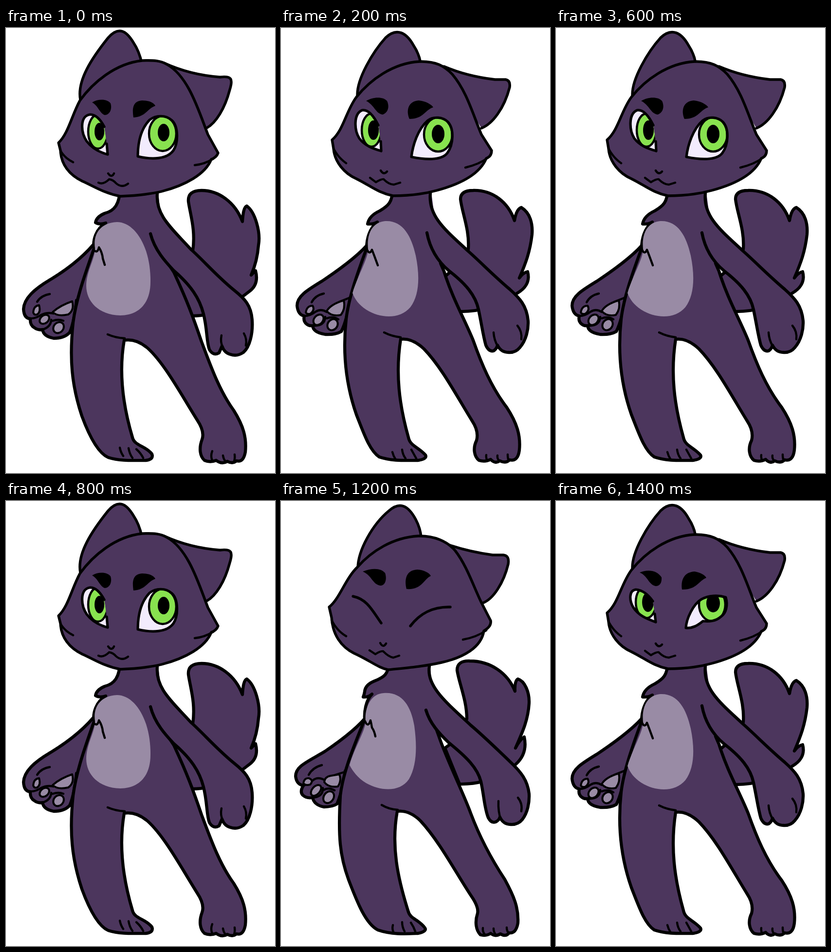
These frames come from a looping animation (553 px wide and 915 px high, 1.6 s). An HTML page without scripts:

```html
<!DOCTYPE html>
<html lang="en">
<head>
<meta charset="utf-8">
<title>Purple cat</title>
<style>
  html, body { margin: 0; width: 100%; height: 100%; overflow: hidden; background: #fff; }
  svg { display: block; width: 100%; height: 100%; }
  path, ellipse { fill: #4c365d; stroke: #000; stroke-width: 6.3; stroke-linecap: round; stroke-linejoin: round; }
  .head path { stroke-width: 5.4; }
  .line, .head .line { fill: none; stroke-width: 4.4; }
  .belly { fill: #998ba5; stroke: none; }
  .pads * { fill: #998ba5; stroke-width: 4; }
  .brow path { fill: #000; stroke: none; }
  .eye { fill: inherit; stroke: inherit; stroke-width: inherit; }
  .white { fill: #f2ebfd; stroke: none; }
  .iris { fill: #88e24f; stroke-width: 4.5; }
  .pupil { fill: #000; stroke: none; }
  .rim { fill: none; stroke: #000; stroke-width: 5.2; }
  .lid { fill: none; }

  /* sway: rest, middle, lean, middle */
  .rest, .lean { animation: quarter .8s step-end infinite; }
  .lean { animation-delay: -.4s; }
  .middle { animation: odd .8s step-end infinite; }
  /* eyes stay open in the first sway and blink in the second */
  .open, .blink { animation: half 1.6s step-end infinite; }
  .blink { animation-delay: -.8s; }
  @keyframes quarter { 0% { opacity: 1 } 25%, 100% { opacity: 0 } }
  @keyframes odd { 0%, 50% { opacity: 0 } 25%, 75%, 100% { opacity: 1 } }
  @keyframes half { 0% { opacity: 1 } 50%, 100% { opacity: 0 } }
</style>
</head>
<body>
<svg viewBox="0 0 553 915" preserveAspectRatio="none">
  <defs>
    <path id="restL" class="eye" d="M202 203Q188 177 172 178C152 181 153 214 166 233C178 249 194 256 209 260L207 238"/>
    <path id="restR" class="eye" d="M271 264C271 242 275 210 295 189C308 179 328 178 341 190C354 202 355 235 344 252C331 270 300 271 271 264Z"/>
    <path id="leanL" class="eye" d="M199 197Q183 164 166 166C148 173 149 206 160 224C172 240 189 245 205 250L204 230"/>
    <path id="leanR" class="eye" d="M267 262C270 238 280 205 301 187C313 178 332 180 342 190C355 204 354 236 341 254C329 270 295 268 267 262Z"/>
    <path id="halfL" class="eye" d="M199 206Q184 184 164 182C150 184 150 204 159 219C171 237 189 243 205 249L203 232"/>
    <path id="halfR" class="eye" d="M267 261C268 242 282 212 299 202C314 194 333 193 349 198C354 215 349 231 340 237C328 248 315 248 302 247C291 256 281 262 267 261Z"/>
    <clipPath id="inRestL"><use href="#restL"/></clipPath>
    <clipPath id="inRestR"><use href="#restR"/></clipPath>
    <clipPath id="inLeanL"><use href="#leanL"/></clipPath>
    <clipPath id="inLeanR"><use href="#leanR"/></clipPath>
    <clipPath id="inHalfL"><use href="#halfL"/></clipPath>
    <clipPath id="inHalfR"><use href="#halfR"/></clipPath>

    <g id="leanEyes">
      <g class="brow">
        <path d="M174 147C187 139 208 137 217 147C223 160 218 172 208 175C193 173 191 155 174 147Z"/>
        <path d="M263 184C255 165 262 147 282 146C297 147 309 155 312 160C294 166 292 184 263 184Z"/>
      </g>
      <g clip-path="url(#inLeanL)">
        <use href="#leanL" class="white"/>
        <ellipse class="iris" cx="185" cy="207" rx="20" ry="34"/>
        <ellipse class="pupil" cx="189" cy="207" rx="11" ry="20"/>
      </g>
      <use href="#leanL" class="rim"/>
      <g clip-path="url(#inLeanR)">
        <use href="#leanR" class="white"/>
        <ellipse class="iris" cx="322" cy="216" rx="29" ry="35"/>
        <ellipse class="pupil" cx="322" cy="215" rx="13" ry="19"/>
      </g>
      <use href="#leanR" class="rim"/>
    </g>
  </defs>

  <g class="rest">
    <path d="M384 458C390 415 379 385 375 357Q373 334 402 334C437 334 471 358 486 398C487 382 489 368 495 366C512 378 524 420 519 447C517 474 511 492 504 508L513 499C518 518 513 532 501 541C476 560 440 593 380 592L346 508L358 498"/>
    <path d="M188 435C165 465 130 494 90 518C58 537 37 556 36 578Q37 597 50 598Q49 611 58 616Q66 622 75 620Q77 634 98 638Q120 638 131 626Q140 605 145 560"/>
    <path class="line" d="M64 563Q72 550 90 547M50 597Q60 598 72 590Q84 584 98 587M75 620Q92 615 93 600M96 602Q108 598 118 602"/>
    <g class="pads">
      <path d="M96 584Q112 570 136 562Q141 580 128 589Q105 594 96 584Z"/>
      <path d="M56 585Q57 571 68 570Q72 584 64 589Q58 591 56 585Z"/>
      <ellipse cx="79" cy="599" rx="11" ry="8" transform="rotate(-40 79 599)"/>
      <ellipse cx="108" cy="616" rx="12" ry="10" transform="rotate(-50 108 616)"/>
    </g>
    <path d="M312 330H234C234 362 223 376 203 381Q186 388 184 400Q192 405 205 401C185 413 178 436 181 453C165 500 145 552 138 605C130 680 135 735 156 798C170 836 188 873 210 883C235 891 262 889 288 889Q304 887 300 876C287 859 264 859 260 842C240 775 232 705 243 642Q268 638 292 659C326 690 361 755 393 806Q409 830 403 846C396 865 399 881 408 889Q420 894 432 889Q444 898 455 891Q466 897 474 890Q488 894 492 872C495 842 488 818 468 786C438 745 419 690 402 645C385 595 372 560 345 502L328 476"/>
    <path class="belly" d="M228 399C266 399 298 452 297 522C297 566 273 591 235 591C190 590 165 562 165 530C165 500 183 475 183 453C179 428 190 401 228 399Z"/>
    <path class="line" d="M181 457Q188 464 191 451Q198 462 199 474L203 487M209 630Q225 637 244 638M234 863Q236 873 241 880M252 864Q254 876 260 884M268 866Q277 874 282 884M424 870Q420 880 424 889M446 879Q447 886 451 891M470 877Q471 885 469 891"/>
    <path d="M297 423C306 458 330 483 345 499C380 529 398 556 406 588C414 620 412 645 418 661Q426 675 438 668L444 654Q449 668 461 671Q475 676 488 667C501 656 508 628 506 600C504 570 490 556 470 540C435 512 405 477 380 455C340 411 307 385 311 340"/>
    <path class="line" d="M443 632Q440 646 446 657M489 628Q496 640 493 653"/>
    <g class="head">
      <path d="M153 148C145 108 178 60 210 20C231 -4 247 5 262 30Q274 48 279 72M325 72C360 88 400 98 440 101C464 98 467 105 460 127C450 165 432 195 412 206"/>
      <path d="M108 236C128 217 135 180 152 149C178 113 224 73 280 67C304 66 318 67 331 75C375 99 396 170 415 219L436 257Q433 266 422 270C410 301 367 324 320 336C290 343 260 345 235 346C202 340 180 325 157 315C130 302 113 280 112 252Z"/>
      <path class="line" d="M112 252Q120 267 138 276M388 282Q408 280 426 269M210 299Q217 309 222 299M190 318Q200 323 212 311Q220 312 226 319Q238 330 251 320"/>
      <g class="brow">
        <path d="M177 153C190 145 209 146 215 155C219 168 212 179 203 179C192 175 190 160 177 153Z"/>
        <path d="M262 184C259 165 261 150 280 149C296 149 305 155 307 160C290 166 288 182 262 184Z"/>
      </g>
      <g clip-path="url(#inRestL)">
        <use href="#restL" class="white"/>
        <ellipse class="iris" cx="189" cy="213" rx="20" ry="35"/>
        <ellipse class="pupil" cx="192" cy="213" rx="10" ry="18"/>
      </g>
      <use href="#restL" class="rim"/>
      <g clip-path="url(#inRestR)">
        <use href="#restR" class="white"/>
        <ellipse class="iris" cx="322" cy="217" rx="28" ry="36"/>
        <ellipse class="pupil" cx="324" cy="215" rx="12" ry="18"/>
      </g>
      <use href="#restR" class="rim"/>
    </g>
  </g>

  <g class="middle">
    <path d="M385 455C388 415 372 380 369 352Q369 334 395 334C435 333 467 358 480 396Q484 372 494 369C512 380 518 402 516 425C512 460 503 484 490 514Q498 503 507 501C513 523 500 537 486 545C463 562 425 584 365 583L337 511L352 498"/>
    <path d="M184 438C165 463 130 490 85 520C52 540 33 552 33 571Q35 590 48 592Q45 603 53 609Q58 613 65 612Q66 626 91 630Q112 631 124 624Q136 600 142 555"/>
    <path class="line" d="M63 564Q70 550 88 546M48 592Q60 592 70 584Q82 576 94 584M65 612Q90 614 91 594M94 597Q107 592 118 599M120 563L140 555"/>
    <g class="pads">
      <path d="M94 582Q102 568 129 560Q133 577 123 590Q104 594 94 582Z"/>
      <path d="M51 585Q53 571 65 571Q70 580 61 587Q54 590 51 585Z"/>
      <ellipse cx="77" cy="600" rx="12" ry="9" transform="rotate(-48 77 600)"/>
      <ellipse cx="106" cy="610" rx="12" ry="10" transform="rotate(-55 106 610)"/>
    </g>
    <path d="M308 330H229C230 358 220 366 203 376Q181 386 178 403Q188 404 198 399C182 412 176 433 176 453C158 502 139 555 134 598C126 670 134 735 155 795C170 833 182 869 202 882C228 891 257 889 282 889Q301 886 297 878C283 862 265 859 262 842C243 775 235 710 246 640Q270 637 294 660C330 697 362 758 393 808Q407 829 402 848C394 864 397 881 407 889Q420 893 431 887Q440 897 450 890Q462 896 470 888Q487 892 490 868C493 838 485 812 464 780C432 738 412 690 395 642C378 600 352 555 335 500L328 484"/>
    <path class="belly" d="M214 397C250 395 268 427 277 468C286 512 284 550 266 574C245 599 205 598 175 579C160 569 152 558 147 545C155 515 179 475 179 455C176 425 186 400 214 397Z"/>
    <path class="line" d="M177 456Q182 467 187 456Q189 461 192 469L199 488M212 626Q228 634 246 636M229 872Q231 880 235 886M249 867Q250 877 256 885M268 867Q273 876 278 885M422 878Q421 884 424 889M445 879Q444 886 449 890M466 877Q466 885 468 889"/>
    <path d="M300 421C307 458 325 482 345 499C380 526 400 550 406 579C413 612 415 630 421 652Q427 666 437 664Q444 659 445 652Q452 667 468 667Q482 668 491 657C504 642 509 620 508 602C505 570 490 555 470 537C440 512 410 481 385 459C340 417 302 388 307 340"/>
    <path class="line" d="M437 626Q438 642 446 655M486 612Q496 624 494 640"/>
    <g class="head">
      <path d="M157 138C156 105 188 50 215 20C238 -2 258 10 272 35Q284 53 287 72M335 79C370 94 405 102 440 106L462 106Q472 108 470 122C459 165 435 197 412 206"/>
      <path d="M105 230C128 211 134 170 155 142C183 107 230 72 285 69C318 68 336 78 352 95C382 130 395 179 412 219L433 252Q433 264 422 268C408 302 365 322 320 334C295 341 260 345 230 345C200 339 185 325 155 310C130 299 110 275 108 248Z"/>
      <path class="line" d="M108 248Q118 267 134 278M379 287Q408 280 425 267M205 293Q211 303 218 295M183 308L195 317Q207 310 211 311Q222 322 232 322L245 318"/>
      <use href="#leanEyes" class="open" x="1" y="3"/>
      <g class="blink">
        <g class="brow">
          <path d="M172 147C188 140 208 142 217 157C218 170 212 175 205 175C190 172 189 154 172 147Z"/>
          <path d="M259 182C256 160 265 146 285 145C298 147 307 153 309 158C293 164 289 183 259 182Z"/>
        </g>
        <g clip-path="url(#inHalfL)">
          <use href="#halfL" class="white"/>
          <ellipse class="iris" cx="185" cy="208" rx="21" ry="33"/>
          <ellipse class="pupil" cx="189" cy="208" rx="12" ry="20"/>
        </g>
        <use href="#halfL" class="rim"/>
        <g clip-path="url(#inHalfR)">
          <use href="#halfR" class="white"/>
          <ellipse class="iris" cx="321" cy="213" rx="27" ry="34"/>
          <ellipse class="pupil" cx="323" cy="210" rx="14" ry="19"/>
        </g>
        <use href="#halfR" class="rim"/>
      </g>
    </g>
  </g>

  <g class="lean">
    <path d="M382 448C382 410 366 375 362 348Q362 328 388 329C431 329 466 354 481 391Q480 370 487 366C501 370 511 393 510 416C508 450 497 474 482 508Q491 491 500 485C506 512 495 530 483 541C460 562 420 583 367 582L337 508L352 497"/>
    <path d="M180 438C162 462 130 488 90 515C55 536 30 545 30 566Q32 583 46 585Q38 598 45 605Q53 612 65 610Q68 625 88 629Q106 629 115 623Q126 598 132 555"/>
    <path class="line" d="M57 563Q65 548 84 543M46 585Q58 582 66 574Q76 566 90 574M65 610Q87 608 86 590M88 594Q98 588 110 595M112 563L128 558"/>
    <g class="pads">
      <path d="M89 578Q90 567 102 565L120 562Q125 575 117 587Q98 590 89 578Z"/>
      <path d="M46 580Q48 569 57 570Q68 574 60 583Q50 586 46 580Z"/>
      <ellipse cx="72" cy="595" rx="13" ry="8" transform="rotate(-48 72 595)"/>
      <ellipse cx="98" cy="609" rx="13" ry="10" transform="rotate(-55 98 609)"/>
    </g>
    <path d="M306 330H222C221 360 208 363 195 369Q173 377 172 392Q171 398 169 403Q179 404 187 397C174 410 171 433 172 449C152 500 128 554 122 605C117 690 121 730 139 779C157 826 174 869 199 882C228 892 258 890 282 889Q300 885 296 878C282 859 265 860 261 842C240 775 226 710 239 638Q264 635 287 658C326 700 361 767 391 812Q407 835 404 848C398 866 401 883 410 892Q422 895 431 889Q440 897 451 890Q462 897 469 888Q483 890 487 868C489 836 478 811 460 778C433 737 408 690 390 642C376 603 340 530 325 485L317 463"/>
    <g class="open"><path class="belly" d="M215 393C255 392 274 415 282 465C289 520 287 555 267 580C245 604 205 600 175 581C151 565 146 540 150 517C154 497 172 474 174 455C171 425 185 394 215 393Z"/></g>
    <g class="blink"><path class="belly" d="M211 395C248 392 267 420 274 462C280 505 279 545 263 572C245 599 205 597 175 580C158 570 147 555 141 543C150 510 172 474 174 455C171 425 185 396 211 395Z"/></g>
    <path class="line" d="M173 453Q179 467 184 451Q186 459 187 466Q192 473 194 484M207 625Q222 634 240 635M230 872Q228 880 231 886M249 866Q249 876 254 885M267 867Q273 876 276 885M415 878Q414 886 419 891M437 879Q437 886 441 891M464 877Q464 885 469 889"/>
    <path d="M298 430C306 457 325 478 345 497C382 527 404 549 411 577C418 610 418 631 426 651Q432 663 441 660Q448 657 450 650Q457 665 472 665Q487 666 496 655C507 641 511 620 510 602C507 574 493 557 473 538C445 511 415 482 390 461C342 416 298 381 305 340"/>
    <path class="line" d="M447 617Q446 639 452 655M487 610Q497 622 494 638"/>
    <g class="head">
      <path d="M158 138C158 102 188 48 222 20C245 0 262 10 277 38Q287 57 288 75M326 83C360 97 400 106 435 111L457 111Q470 112 467 130C458 167 437 202 414 210"/>
      <path d="M99 218C120 202 132 160 157 136C186 103 230 75 282 72C315 71 342 83 358 102C382 133 395 174 412 209L431 246Q433 258 417 267C412 301 375 322 330 332C295 340 260 343 220 347C200 343 183 328 150 313C124 300 106 275 104 240Z"/>
      <path class="line" d="M104 245Q115 267 134 278M374 285Q402 280 422 266M204 292Q210 303 216 293M182 307L194 315Q204 308 210 309Q222 321 231 322L243 318"/>
      <use href="#leanEyes" class="open"/>
      <g class="blink">
        <g class="brow">
          <path d="M168 145C188 137 206 138 214 148C218 160 215 173 205 174C188 172 188 154 168 145Z"/>
          <path d="M258 181C253 160 258 142 280 141C295 142 305 148 308 154C293 161 290 183 258 181Z"/>
        </g>
        <path class="lid" d="M148 196C177 202 187 224 206 251M266 257C285 232 310 217 348 218"/>
      </g>
    </g>
  </g>
</svg>
</body>
</html>
```
